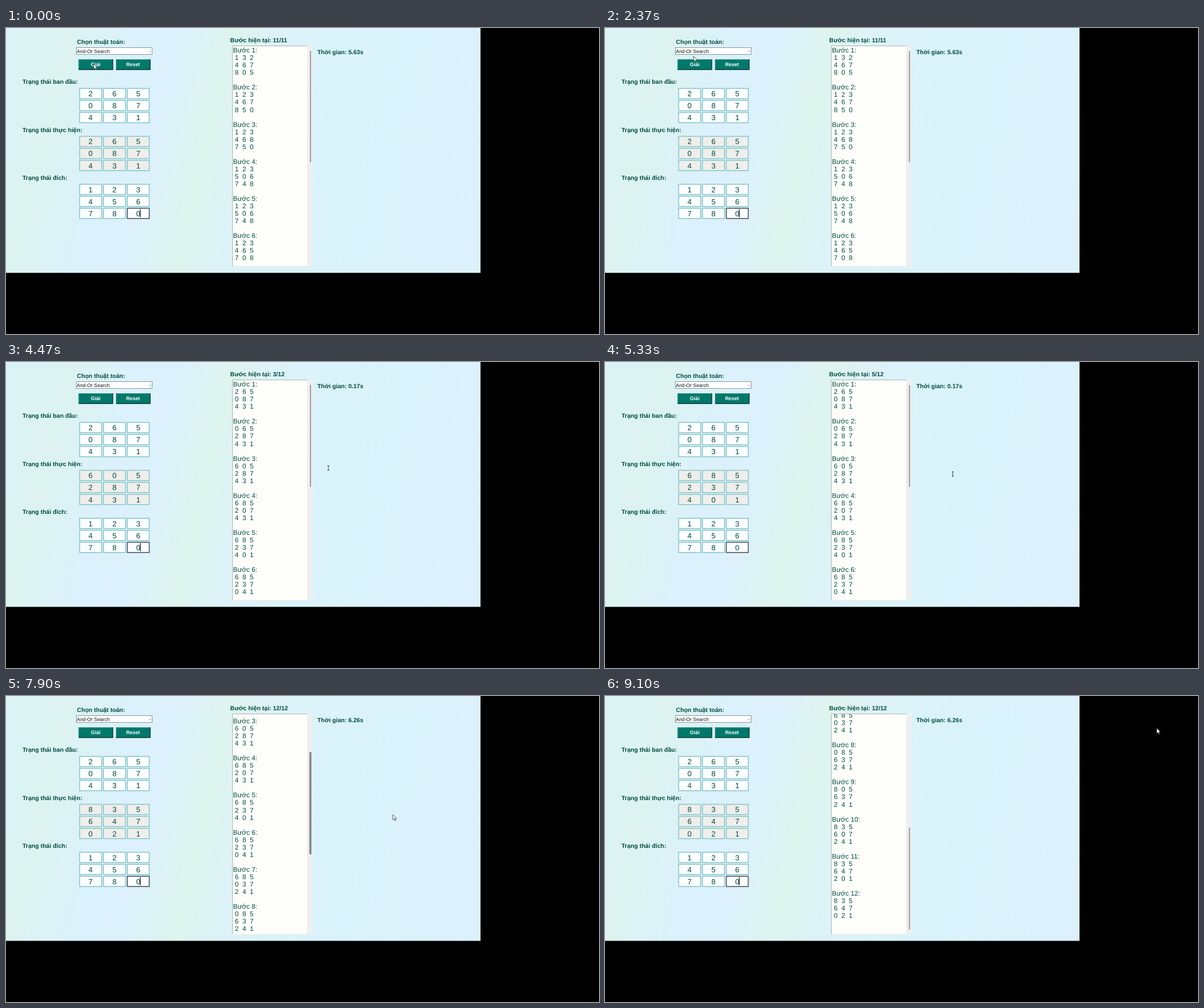
An HTML page for the animation above (9.13 s loop, 1041x538 px).

```html
<!DOCTYPE html>
<html lang="vi">
<head>
<meta charset="utf-8">
<title>8-puzzle</title>
<style>
  html, body { margin: 0; width: 100%; height: 100%; overflow: hidden; background: #000; }
  svg { display: block; position: absolute; left: 0; top: 0; }
  text { font-family: "Liberation Sans", Arial, sans-serif; fill: #004d40; white-space: pre; text-rendering: geometricPrecision; }
  .label { font-size: 10.55px; font-weight: bold; }
  .button { font-size: 8.9px; font-weight: bold; fill: #fff; text-anchor: middle; }
  .digit { font-size: 13.2px; text-anchor: middle; }
  .log { font-size: 11.8px; }
</style>
</head>
<body>
<svg id="stage" width="1041" height="538" viewBox="0 0 1041 538">
  <defs>
    <linearGradient id="sky" gradientUnits="userSpaceOnUse" x1="0" y1="215" x2="820" y2="415">
      <stop offset="0" stop-color="#dbf3f3"/>
      <stop offset=".07" stop-color="#dcf3f0"/>
      <stop offset=".2" stop-color="#dbf1fc"/>
      <stop offset=".3" stop-color="#dcf1fb"/>
      <stop offset=".4" stop-color="#def4ee"/>
      <stop offset=".5" stop-color="#dcf2f8"/>
      <stop offset=".66" stop-color="#daf3fb"/>
      <stop offset="1" stop-color="#dcf1fc"/>
    </linearGradient>
    <clipPath id="logClip"><rect x="398" y="32" width="131" height="386.5"/></clipPath>
  </defs>
  <rect width="1041" height="538" fill="#000"/>
  <rect width="833" height="430.5" fill="url(#sky)"/>
</svg>
<script>
const LOOP = 9130;
const PRESS = 3450, SOLVED = 3700, STEP = 338;
const GRAB = 7600, RELEASE = 8400;
const THUMB_TOP = 40, THUMB_TRAVEL = 191, SCROLL_RATIO = 409.4 / THUMB_TRAVEL;

const oldSteps = ['132467805', '123467850', '123468750', '123506748', '123506748', '123465708'];
const newSteps = ['265087431', '065287431', '605287431', '685207431', '685237401', '685237041',
  '685037241', '085637241', '805637241', '835607241', '835647201', '835647021'];
const finish = SOLVED + newSteps.length * STEP;

// time, x, y of the pointer tip
const path = [
  [0, 154, 63], [600, 154, 63], [900, 155.5, 49.5], [3000, 155.5, 49.5],
  [3300, 157, 62], [3450, 157, 62], [3570, 226.5, 76.5], [3750, 310, 110],
  [4400, 560, 185], [5000, 610.5, 197], [5700, 610.5, 197], [6530, 702, 140],
  [6730, 838.5, 79.5], [6900, 853, 84], [7100, 800, 105], [7480, 533, 150],
  [7600, 533, 150], [7900, 679, 208], [8130, 718, 341], [8260, 722, 448],
  [8420, 716, 395], [8850, 930, 110], [9050, 968.5, 56.5], [9130, 968.5, 56.5]
];

const stage = document.getElementById('stage');

function add(tag, attrs, parent = stage) {
  const node = document.createElementNS('http://www.w3.org/2000/svg', tag);
  for (const key in attrs) node.setAttribute(key, attrs[key]);
  return parent.appendChild(node);
}
function write(x, y, content, cls, parent) {
  const node = add('text', { x, y, class: cls }, parent);
  node.textContent = content;
  return node;
}
function setText(node, content) {
  if (node.textContent !== content) node.textContent = content;
}
function show(node, visible) {
  node.style.display = visible ? '' : 'none';
}

function makeButton(x, label) {
  const face = add('rect', { x, y: 55, width: 60.5, height: 18.5, fill: '#00796b' });
  add('path', { d: `M${x + .5} 73V55.5H${x + 60}`, fill: 'none', stroke: '#2f8f84' });
  add('path', { d: `M${x} 73H${x + 60}V55`, fill: 'none', stroke: '#123f3b', 'stroke-width': 1.4 });
  write(x + 30, 67.2, label, 'button');
  return face;
}

function makeBoard(top, digits, fill) {
  return [...digits].map((digit, i) => {
    const x = 148.5 + i % 3 * 41.8, y = top + Math.floor(i / 3) * 21.1;
    const focused = top > 280 && i === 8;
    add('rect', {
      x: x - 19.2, y: y - 9, width: 38.6, height: 18, fill,
      stroke: focused ? '#4b5660' : '#8bc7c8', 'stroke-width': 1.6
    });
    return write(x, y + 4.8, digit, 'digit');
  });
}

function makeLog(boards, parent) {
  const group = add('g', {}, parent);
  boards.forEach((board, i) => {
    const y = 43.2 + i * 65.2;
    write(398.6, y, `Bước ${i + 1}:`, 'log', group);
    for (let row = 0; row < 3; row++) {
      const line = ' ' + [...board.slice(row * 3, row * 3 + 3)].join('  ');
      write(398.6, y + 13.04 * (row + 1), line, 'log', group);
    }
  });
  return group;
}

write(124.6, 27.6, 'Chọn thuật toán:', 'label');
add('rect', { x: 123.5, y: 34.5, width: 133, height: 12, fill: '#fff', stroke: '#87969a' });
write(124.2, 44, 'And-Or Search', '').style.cssText = 'font-size:8.7px;fill:#111';
add('path', { d: 'M250.5 40l2.2 2.2 2.2-2.2', fill: 'none', stroke: '#777', 'stroke-width': .8 });
const solveFace = makeButton(127.5, 'Giải');
makeButton(193, 'Reset');

write(29, 98.3, 'Trạng thái ban đầu:', 'label');
makeBoard(115.3, newSteps[0], '#fcfefe');
write(29, 182.5, 'Trạng thái thực hiện:', 'label');
const current = makeBoard(199.5, newSteps[0], '#efeeeb');
write(29, 266.7, 'Trạng thái đích:', 'label');
makeBoard(283.7, '123456780', '#fcfefe');
const caret = add('rect', { x: 235, y: 318.5, width: 1.3, height: 14.5, fill: '#222' });

const stepLabel = write(393.6, 25, '', 'label');
const timeLabel = write(546.6, 45.8, '', 'label');
add('rect', { x: 397, y: 31, width: 133, height: 388.5, fill: '#fdfefa' });
add('path', { d: 'M397.5 419V31.5H529', fill: 'none', stroke: '#a9b3b1' });
add('path', { d: 'M398 419H529.5V32', fill: 'none', stroke: '#e6e9e6' });
add('rect', { x: 530, y: 31, width: 8, height: 388.5, fill: '#eeefee' });
const logView = add('g', { 'clip-path': 'url(#logClip)' });
const oldLog = makeLog(oldSteps, logView);
const newLog = makeLog(newSteps, logView);
const thumb = add('rect', { rx: 1 });

const arrow = add('path', {
  d: 'M0 0V9.2L2.1 7.3 3.5 10.6 5 10 3.6 6.8H6.5Z',
  fill: '#fff', stroke: '#333', 'stroke-width': .8, 'stroke-linejoin': 'round'
});
const beam = add('path', {
  d: 'M-1.8-4H1.8M0-4V4M-1.8 4H1.8', fill: 'none', stroke: '#333', 'stroke-width': .9
});

function pointerAt(t) {
  const i = Math.max(1, path.findIndex(point => point[0] > t));
  const [t0, x0, y0] = path[i - 1], [t1, x1, y1] = path[i];
  const k = (t - t0) / (t1 - t0);
  return [x0 + (x1 - x0) * k, y0 + (y1 - y0) * k];
}

function caretVisible(t) {
  if (t >= PRESS && t < SOLVED) return true;
  const phase = (t < SOLVED ? t + 200 : t + 580) % 600;
  return phase < 400;
}

function render(t) {
  const solved = t >= SOLVED;
  const step = Math.min(newSteps.length, Math.floor((t - SOLVED) / STEP) + 1);
  setText(stepLabel, 'Bước hiện tại: ' + (solved ? `${step}/12` : '11/11'));
  setText(timeLabel, `Thời gian: ${!solved ? '5.63' : t < finish ? '0.17' : '6.26'}s`);
  const board = newSteps[solved ? step - 1 : 0];
  current.forEach((cell, i) => setText(cell, board[i]));
  solveFace.setAttribute('fill', t >= PRESS && t < SOLVED ? '#004d40' : '#00796b');
  show(caret, caretVisible(t));

  const [x, y] = pointerAt(t);
  const dragging = t >= GRAB && t < RELEASE;
  const shift = t < GRAB ? 0 : dragging ? Math.min(THUMB_TRAVEL, Math.max(0, y - 150)) : THUMB_TRAVEL;
  show(oldLog, !solved);
  show(newLog, solved);
  newLog.setAttribute('transform', `translate(0 ${-shift * SCROLL_RATIO})`);
  const wide = dragging || (x > 529 && x < 538);
  thumb.setAttribute('x', wide ? 532.6 : 533.7);
  thumb.setAttribute('width', wide ? 3.6 : 1.6);
  thumb.setAttribute('fill', wide ? '#858585' : '#8c857c');
  thumb.setAttribute('y', THUMB_TOP + shift);
  thumb.setAttribute('height', solved ? 180 : 196);

  const overText = !dragging && y < 430 && ((x > 397 && x < 530) || (x > 538 && x < 833));
  const place = `translate(${x} ${y})`;
  arrow.setAttribute('transform', place);
  beam.setAttribute('transform', place);
  show(arrow, !overText);
  show(beam, overText);
}

const start = performance.now();
function tick() {
  render((performance.now() - start) % LOOP);
  requestAnimationFrame(tick);
}
tick();
</script>
</body>
</html>
```
